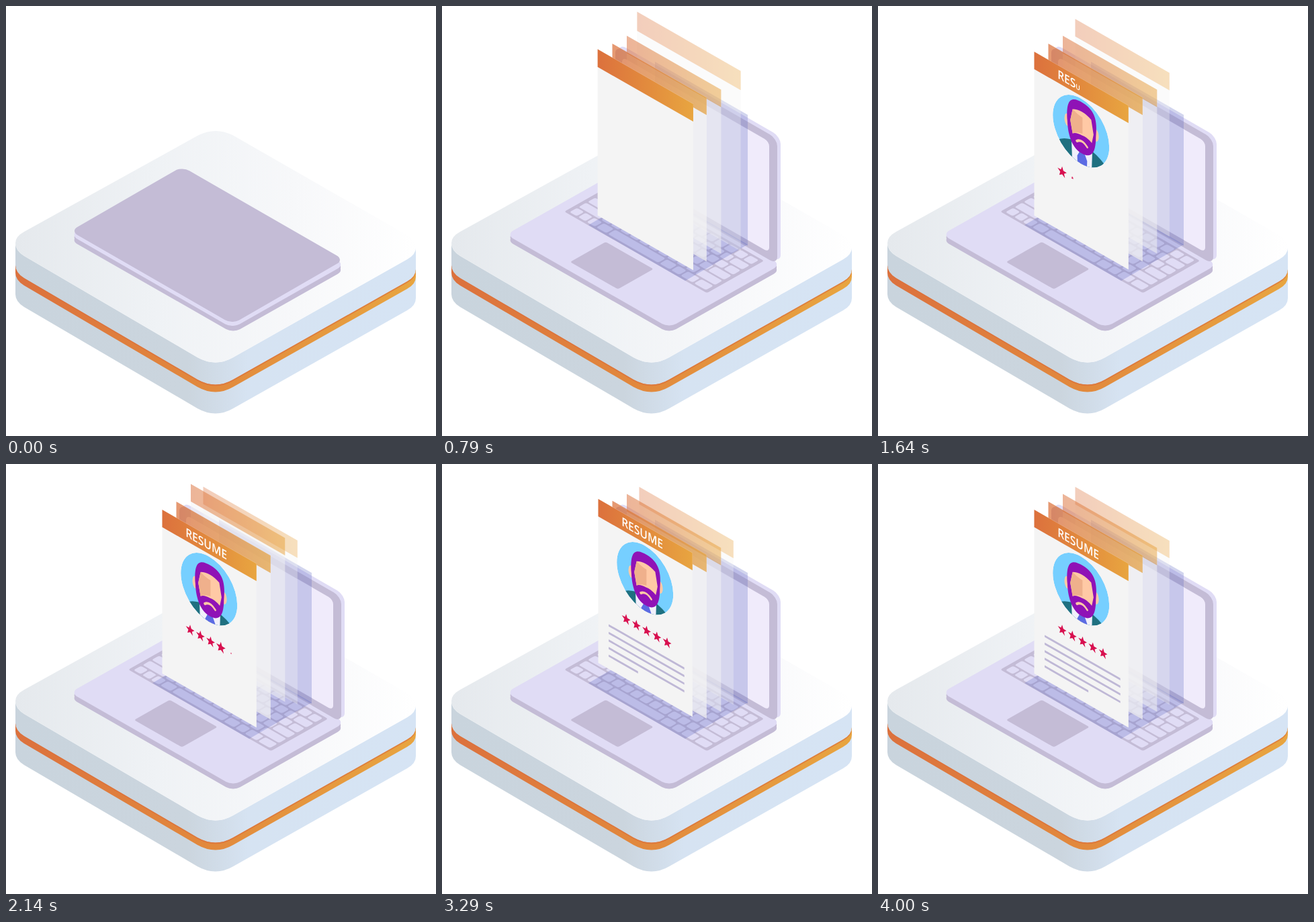
Animation of 640x640 px, one loop 4780 ms. Source, as an HTML page:

```html
<!DOCTYPE html>
<html lang="en">
<head>
<meta charset="utf-8">
<title>Resume on a laptop</title>
<style>
  html, body { margin: 0; width: 100%; height: 100%; overflow: hidden; background: #fff; }
  svg { display: block; width: 100vw; height: 100vh; }
  text { font: 600 18px "Open Sans", sans-serif; fill: #fff; }
</style>
</head>
<body>
<svg id="stage" viewBox="0 0 640 640"></svg>
<script>
const LOOP = 4780, FPS = 14;
const LIGHT = '#e0dcf5', DARK = '#c4bcd6', SKIN = '#ffc9a5', HAIR = '#8f12b6';
const PAGE_ORIGIN = [[293.5, 34], [275, 44.5], [253.5, 56], [232.5, 68]];
const PAGE_OPACITY = [.34, .52, .72, 1];
const PAGE_PIVOT = [[325, 290], [306, 327], [300, 327], [293, 326]];
const PAGE_START = [532, 365, 430, 398];
const PAGE_POP = [430, 430, 360, 430];
const LINES = [130, 130, 130, 130, 75];

const range = n => [...Array(n).keys()];
const clamp = x => Math.min(1, Math.max(0, x));

// Side wall of the platform: the front rim at height y, extruded by h.
const rim = (y, h) => `M14 ${y}q0 11 13 19l258 151q27 15 53 0l259-146q13-7 13-18` +
  `v${h}q0 11-13 18l-259 146q-26 15-53 0l-258-151q-13-8-13-19z`;

const gradient = (id, ...stops) => `<linearGradient id="${id}">` + stops.map(([at, color]) =>
  `<stop offset="${at}" stop-color="${color}"/>`).join('') + '</linearGradient>';

const rect = (x, y, w, h, rx, fill, extra = '') =>
  `<rect x="${x}" y="${y}" width="${w}" height="${h}" rx="${rx}" fill="${fill}" ${extra}/>`;

function keyboard() {
  const width = 237, pitch = 15.6;
  const rows = [
    Array(14).fill(1),
    [...Array(13).fill(1), 1.6],
    [1.5, ...Array(12).fill(1), 1.2],
    [1.9, ...Array(11).fill(1), 1.9],
    [2.4, ...Array(10).fill(1), 2.3],
    [.9, .9, 1, 1.2, 5.4, 1.2, 1, 1.4, 1.4]
  ];
  return rows.map((row, r) => {
    const unit = width / row.reduce((a, b) => a + b);
    let x = 4;
    return row.map(w => {
      const key = rect(x + 1.2, 3.5 + r * pitch, w * unit - 2.6, pitch - 2.8, 3, LIGHT);
      x += w * unit;
      return key;
    }).join('');
  }).join('');
}

const deck = (dy, fill) =>
  `<g transform="translate(0 ${dy}) matrix(.866 .495 -.866 .49 267 258)">${rect(-15, -9, 280, 192, 12, fill)}</g>`;

const star = 'M' + range(10).map(i => {
  const r = i % 2 ? 3.3 : 7.8, a = i * Math.PI / 5;
  return `${(r * Math.sin(a)).toFixed(2)} ${(-r * Math.cos(a)).toFixed(2)}`;
}).join('L') + 'z';

const person = `
  <path d="M26 240V136Q38 113 64 106H100Q126 112 138 136V240z" fill="#1f7080"/>
  <path d="M64 102H100L95 240H69z" fill="#f1f0fb"/>
  <path d="M78 117h9l4 8-4 100h-9l-4-100z" fill="#5c6be3"/>
  <ellipse cx="57" cy="80" rx="5" ry="9" fill="${SKIN}"/>
  <ellipse cx="106" cy="79" rx="5" ry="9" fill="${SKIN}"/>
  <path d="M57 82C54 50 64 41 84 42C104 43 109 55 106 82C106 108 96 118 82 118C66 118 58 104 57 82z" fill="${HAIR}"/>
  <path d="M62 78L66 60Q82 52 98 60L102 80L99 94Q90 89 82 91Q72 91 66 96z" fill="${SKIN}"/>
  <path d="M62 78L66 60Q75 64 83 64V88Q72 90 66 96z" fill="#efb08c"/>
  <path d="M73 104Q82 96 91 104" fill="none" stroke="${SKIN}" stroke-width="3.5" stroke-linecap="round"/>`;

const content = `
  <text x="40" y="19.5">${[...'RESUME'].map(c => `<tspan class="letter">${c}</tspan>`).join('')}</text>
  <g id="avatar" clip-path="url(#round)">
    <circle cx="80.5" cy="78.3" r="48.5" fill="#76cfff"/><g id="person">${person}</g>
  </g>
  ${range(5).map(() => `<path class="star" d="${star}" fill="#d8104f"/>`).join('')}
  ${LINES.map((w, i) => rect(18, 177.5 + i * 11.3, w, 3.2, 0, '#bfb8d6', 'class="line"')).join('')}`;

const page = i => `<g class="page" opacity="${PAGE_OPACITY[i]}">
  <g transform="matrix(.866 .495 0 1 ${PAGE_ORIGIN[i]})">
    ${rect(0, 0, 162, 244, 0, '#f4f4f4')}${rect(0, 0, 162, 26, 0, 'url(#orange)')}
    ${i === 3 ? content : ''}
  </g></g>`;

const stage = document.getElementById('stage');
stage.innerHTML = `
  <defs>
    ${gradient('top', [0, '#e5e9ed'], [.35, '#eff2f5'], [.7, '#f7f8fa'], [1, '#fff'])}
    ${gradient('side', [0, '#c9d4dd'], [.43, '#cbd5de'], [.58, '#d6e3f2'], [1, '#d6e4f4'])}
    ${gradient('orange', [0, '#dc713d'], [.5, '#e28a3d'], [1, '#e8a540'])}
    <clipPath id="round"><circle cx="80.5" cy="78.3" r="48.5"/></clipPath>
  </defs>
  <path d="${rim(353, 76)}" fill="url(#side)"/>
  <path d="${rim(386, 11)}" fill="url(#orange)"/>
  <path d="${rim(386, 2)}" fill="#dc713d" opacity=".7"/>
  <path d="M287 192Q312 180 337 192L597 341Q610 349 610 359Q610 370 597 377L338 523Q312 538 285 523L27 372Q14 364 14 353Q14 343 27 336z" fill="url(#top)"/>
  ${deck(8, DARK)}${deck(4, DARK)}${deck(0, LIGHT)}
  <g transform="matrix(.866 .495 -.866 .49 267 258)">
    ${rect(0, 0, 245, 98, 3, DARK)}${keyboard()}${rect(81, 108, 82, 61, 3, DARK)}
  </g>
  <g id="lidBack">${rect(0, 0, 241, 187, 11, LIGHT)}</g>
  <g id="lid">${rect(0, 0, 241, 187, 11, DARK)}${rect(10, 11, 219, 165, 7, '#f0ebfb', 'id="screen"')}</g>
  <g id="shadow" fill="#5a66c0" fill-opacity=".27">
    <path d="M317 83L455 162V357L317 278z"/><path d="M218 326L362 409L455 355L311 272z"/>
  </g>
  ${range(4).map(page).join('')}`;

const $ = id => document.getElementById(id);
const all = name => [...stage.querySelectorAll('.' + name)];
const pages = all('page'), letters = all('letter'), stars = all('star'), lines = all('line');
const move = (el, value) => el.setAttribute('transform', value);
const scaleAt = (x, y, s) => `translate(${x} ${y}) scale(${s}) translate(${-x} ${-y})`;

// Grow from 0 past 1, then settle.
function pop(t, start, length, over = .1) {
  const p = clamp((t - start) / length);
  return p < .6 ? (1 + over) * Math.sin(Math.PI / 2 * p / .6)
                : 1 + over * (1 + Math.cos(Math.PI * (p - .6) / .4)) / 2;
}

// One smooth rise and fall.
const bob = (t, start, length) => (1 - Math.cos(2 * Math.PI * clamp((t - start) / length))) / 2;

function openLid(t) {
  const p = clamp(t / 360), angle = Math.PI / 2 * p * p * (3 - 2 * p);
  const c = Math.cos(angle), s = Math.sin(angle);
  const place = (dx, dy) =>
    `matrix(1 .575 ${-.888 * c} ${.513 * c - s} ${258 + 4 * c + dx} ${246 - 7 * c + dy})`;
  move($('lid'), place(0, 0));
  move($('lidBack'), place(5 * s, 6 * c - 3 * s));
  $('screen').style.visibility = s > 1.024 * c ? 'visible' : 'hidden';
}

function draw(t) {
  openLid(t);
  move($('shadow'), scaleAt(295, 328, pop(t, 430, 360)));
  pages.forEach((el, i) => {
    const lift = (i === 3 ? 17.5 : 15) * bob(t, 1000 + 600 * i, 1200);
    move(el, `translate(0 ${-lift}) ` + scaleAt(...PAGE_PIVOT[i], pop(t, PAGE_START[i], PAGE_POP[i])));
  });
  move($('avatar'), scaleAt(80.5, 78.3, pop(t, 788, 500)));
  move($('person'), `translate(0 ${95 * (1 - pop(t, 1290, 600, .075))})`);
  letters.forEach((el, i) => el.style.fontSize = 18 * pop(t, 1285 + 100 * i, 250, 0) + 'px');
  stars.forEach((el, i) =>
    move(el, `translate(${48 + 17.6 * i} 155.3) scale(${pop(t, 1448 + 170 * i, 250)})`));
  lines.forEach((el, i) => el.setAttribute('width', LINES[i] * clamp((t - 2641 - 138 * i) / 138)));
}

// Hold each pose for one tick; tick times are rounded to 10 ms.
function tick() {
  const t = performance.now() % LOOP;
  const step = Math.min(56, Math.floor((Math.floor(t / 10) * 10 + 4.9) * FPS / 1000));
  draw(step * 1000 / FPS);
  requestAnimationFrame(tick);
}
tick();
</script>
</body>
</html>
```
